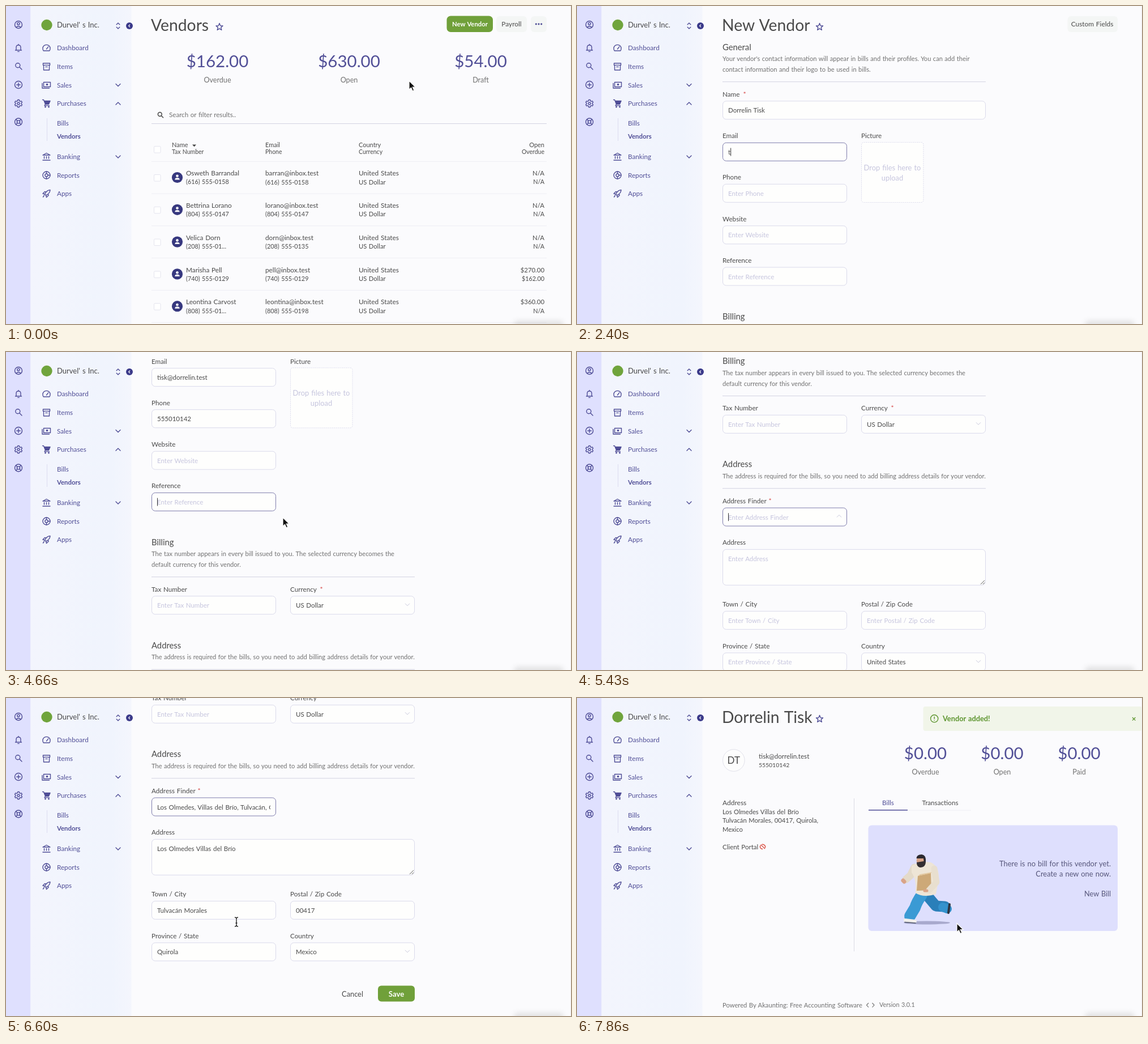
An HTML page for the animation above (7.93 s loop, 998x561 px).

```html
<!DOCTYPE html>
<html lang="en">
<head>
<meta charset="utf-8">
<title>New vendor</title>
<style>
html, body { margin: 0; width: 100%; height: 100%; overflow: hidden; background: #fbfbfd; }
#stage { display: block; width: 998px; height: 561px; }
text { font-family: Lato, "Open Sans", sans-serif; fill: #4a4a4a; word-spacing: .06em; white-space: pre; }
.r { text-anchor: end; }
.m { text-anchor: middle; }
.b { font-weight: 700; }
.p { fill: #514f97; }
.g { fill: #717171; }
.d { fill: #56567a; }
.w { fill: #fff; }
.h { fill: #c6c5de; }
.red { fill: #d33a3a; }
.ok { fill: #5d952f; }
.i { fill: none; stroke: #4f4d96; stroke-width: 1.4; stroke-linecap: round; stroke-linejoin: round; }
.s { fill: #4f4d96; stroke: none; }
.box { fill: #fefefd; stroke: #dadaeb; }
.focus { stroke: #7f7dad; }
.hover { stroke: #93929f; }
.rule { stroke: #d3d3e2; }
.soft { stroke: #eeeef4; }
</style>
</head>
<body>
<svg id="stage" viewBox="0 0 998 561"></svg>
<script>
const LOOP = 7930;
const stage = document.getElementById('stage');

// Drawing helpers; text is centred on y
const txt = (x, y, s, size = 11.7, cls = '') =>
  `<text x="${x}" y="${(y + size * .36).toFixed(2)}" font-size="${size}" class="${cls}">${s}</text>`;
const rect = (x, y, w, h, r, attrs) => `<rect x="${x}" y="${y}" width="${w}" height="${h}" rx="${r}" ${attrs}/>`;
const line = (x1, y1, x2, y2, cls = 'rule') => `<path d="M${x1} ${y1}L${x2} ${y2}" class="${cls}"/>`;
const icon = (x, y, d, more = '') => `<g class="i" transform="translate(${x} ${y})"><path d="${d}"/>${more}</g>`;
const dot = (r, cls = '', x = 0, y = 0) => `<circle cx="${x}" cy="${y}" r="${r}" class="${cls}"/>`;
const group = (id, body) => `<g id="${id}">${body}</g>`;
const down = 'M-4-2L0 2L4-2', up = 'M-4 2L0-2L4 2';
const star = (x, y) => icon(x, y, 'M0-6L1.7-1.8L6-1.5L2.7 1.4L3.8 5.8L0 3.4L-3.8 5.8L-2.7 1.4L-6-1.5L-1.7-1.8Z');
const title = (s, starX) => txt(256, 34, s, 28.3) + star(starX, 36.5);
const amount = (x, s, label) => txt(x, 97.5, s, 29.5, 'm p') + txt(x, 130.5, label, 12.6, 'm g');

function rail() {
  const spokes = 'M-4.6-4.6L-1.8-1.8M4.6-4.6L1.8-1.8M-4.6 4.6L-1.8 1.8M4.6 4.6L1.8 1.8';
  const teeth = 'M-1.3-6.5H1.3L1.8-4.6L3.4-3.7L5.3-4.3L6.5-2L5.1-.7V.7L6.5 2L5.3 4.3L3.4 3.7L1.8 4.6L1.3 6.5H-1.3L-1.8 4.6L-3.4 3.7L-5.3 4.3L-6.5 2L-5.1.7V-.7L-6.5-2L-5.3-4.3L-3.4-3.7L-1.8-4.6Z';
  return rect(0, 0, 43.5, 561, 0, 'fill="#dfe0fe"') +
    icon(22, 33, 'M-4.2 4.6Q0 .9 4.2 4.6', dot(6.5) + dot(2.1, '', 0, -1.8)) +
    icon(22, 74, 'M-5.5 4H5.5M-4 4V-1Q-4-5 0-5Q4-5 4-1V4M0-6.5V-5M-1.2 6.4H1.2') +
    icon(22, 106, 'M1.8 1.8L6 6', dot(4, '', -1.2, -1.2)) +
    icon(22, 139, 'M-3.2 0H3.2M0-3.2V3.2', dot(6.5)) +
    icon(22, 172, teeth, dot(2)) +
    icon(22, 204.5, spokes, dot(6.5) + dot(2.6));
}

function menu() {
  const items = [
    [74, 'Dashboard', 'M-5.2 5A6.6 6.6 0 1 1 5.2 5ZM0 2L3.2-2.2'],
    [107, 'Items', 'M-6-6H6V-2.6H-6ZM-5-2.6V6H5V-2.6M-1.6 .4H1.6'],
    [139.5, 'Sales', 'M-5-5H7V3H-5ZM-7.5-3V5.5H5', down],
    [172, 'Purchases', 'M-7-6.5H-5L-2 1.3H4L6.5-4.5H-4.2L-2 1.3L-3.5 3.6H5', up],
    [266, 'Banking', 'M-6.5-3L0-6.5L6.5-3ZM-4-.5V3M0-.5V3M4-.5V3M-6.5 6H6.5', down],
    [298.5, 'Reports', 'M0-6.5V-2.5M0 6.5V2.5M2.5 0H6.5'],
    [331, 'Apps', 'M-3 1Q0-6 6.5-6.5Q6 0-1 3ZM-3 1L-6.5 0L-3-3.6L-1-3M-1 3L0 6.5L3.6 3L3 1M-4 3L-6 6']
  ];
  const extra = {
    Sales: dot(1.8, 's', 1, -1),
    Purchases: '<path class="s" d="M-4.5-4.5H6.5L4 1.3H-2Z"/>' + dot(1.4, 's', -2, 6) + dot(1.4, 's', 4, 6),
    Reports: dot(6.5) + dot(2.6)
  };
  return rect(43.5, 0, 178, 561, 0, 'fill="url(#panel)"') +
    '<circle cx="72" cy="33.5" r="9.7" fill="#70a43c"/>' +
    txt(90, 33.5, "Durvel' s Inc.", 13) +
    icon(198, 35, 'M-2.8-2.2L0-5L2.8-2.2M-2.8 2.2L0 5L2.8 2.2') +
    '<circle cx="218" cy="35" r="6" fill="#3b3a8a"/><path d="M219 32.7L216.7 35L219 37.3" fill="none" stroke="#fff" stroke-width="1.2"/>' +
    items.map(([y, s, d, arrow]) => icon(71.5, y, d, extra[s]) + txt(90, y, s, 11.7, 'p') +
      (arrow ? icon(198, y, arrow) : '')).join('') +
    '<path d="M72.5 198V238" stroke="#dcdcf0"/>' +
    txt(90, 206.5, 'Bills', 11.7, 'p') + txt(90, 230, 'Vendors', 11.4, 'b p');
}

function listPage() {
  const people = [
    ['Osweth Barrandal', 'barran@inbox.test', '(616) 555-0158', 'N/A', 'N/A'],
    ['Bettrina Lorano', 'lorano@inbox.test', '(804) 555-0147', 'N/A', 'N/A'],
    ['Velica Dorn', 'dorn@inbox.test', '(208) 555-0135', 'N/A', 'N/A', 1],
    ['Marisha Pell', 'pell@inbox.test', '(740) 555-0129', '$270.00', '$162.00'],
    ['Leontina Carvost', 'leontina@inbox.test', '(808) 555-0198', '$360.00', 'N/A', 1]
  ];
  const check = y => rect(261.5, y - 5.5, 11.5, 11.5, 1.5, 'fill="#fff" stroke="#e4e4ee"');
  const head = (x, a, b, cls = '') => txt(x, 245, a, 11, cls) + txt(x, 257.5, b, 10.5, cls);
  const rows = people.map(([name, mail, phone, open, due, cut], i) => {
    const y = 295 + i * 56.8, y2 = y + 15.6;
    return check(y + 8) + `<circle cx="302.5" cy="${y + 7.5}" r="9.6" fill="#37387f"/>` +
      `<path d="M298.3 ${y + 11.5}q0-3.4 4.2-3.4t4.2 3.4z" fill="#fff"/><circle cx="302.5" cy="${y + 4.8}" r="2.3" fill="#fff"/>` +
      txt(318, y, name, 11.8) + txt(318, y2, cut ? phone.slice(0, 12) + '...' : phone, 10.8) +
      txt(458, y, mail, 11.8) + txt(458, y2, phone, 10.9) +
      txt(623, y, 'United States', 11.9) + txt(623, y2, 'US Dollar', 11.2) +
      txt(951, y, open, 11.4, 'r') + txt(951, y2, due, 10.8, 'r') +
      line(257, y + 36, 955, y + 36, 'soft');
  }).join('');
  return title('Vendors', 377) +
    rect(778.5, 17.5, 81.5, 28.5, 7, 'id="newBtn"') + txt(819.5, 32, 'New Vendor', 11.3, 'm b w') +
    rect(866, 18, 54, 28, 6, 'fill="#f4f6f5"') + txt(893, 32, 'Payroll', 11.9, 'm') +
    rect(927, 18, 28, 28, 6, 'fill="#f4f6f5"') +
    [936.3, 941, 945.7].map(x => dot(1.6, 's', x, 31.8)).join('') +
    amount(373.5, '$162.00', 'Overdue') + amount(606, '$630.00', 'Open') + amount(838.5, '$54.00', 'Draft') +
    '<g fill="none" stroke="#444" stroke-width="1.5"><circle cx="271.8" cy="191" r="3.4"/><path d="M274.3 193.5L278 197.2"/></g>' +
    txt(288, 192, 'Search or filter results..', 11.6, 'g') + line(257, 207.5, 955, 207.5) +
    check(253) + head(293, 'Name', 'Tax Number') + '<path d="M329 244.5h7l-3.5 3.7z" fill="#424242"/>' +
    head(458, 'Email', 'Phone') + head(623, 'Country', 'Currency') + head(951, 'Open', 'Overdue', 'r') +
    line(257, 274.3, 955, 274.3, 'soft') + rows;
}

// Form fields: id, label, x, label y, width, x of the required mark, kind
const FIELDS = [
  ['name', 'Name', 257, 155.5, 465, 296],
  ['email', 'Email', 257, 229, 220],
  ['phone', 'Phone', 257, 302, 220],
  ['website', 'Website', 257, 375.5, 220],
  ['ref', 'Reference', 257, 448.7, 220],
  ['tax', 'Tax Number', 257, 631, 220],
  ['currency', 'Currency', 502, 631, 220, 557, 'select'],
  ['finder', 'Address Finder', 257, 794.7, 220, 341, 'finder'],
  ['address', 'Address', 257, 868, 465, 0, 'area'],
  ['town', 'Town / City', 257, 977, 220],
  ['zip', 'Postal / Zip Code', 502, 977, 220],
  ['state', 'Province / State', 257, 1050.5, 220],
  ['country', 'Country', 502, 1050.5, 220, 0, 'select']
];

function field([id, label, x, y, w, mark, kind]) {
  const top = y + 11.8, area = kind === 'area';
  return txt(x, y, label, 11.7) + (mark ? txt(mark, y, '*', 12, 'm red') : '') +
    rect(x + .5, top + .5, w - 1, area ? 63 : 32, 6, `class="box" id="${id}Box"`) +
    `<svg x="${x + 10}" y="${top}" width="${w - 20}" height="33"><text id="${id}" y="21" font-size="11.5"></text></svg>` +
    (kind === 'select' ? `<path d="M${x + 203} ${top + 13.5}l4 4l4-4" fill="none" stroke="#c9c9dc"/>` : '') +
    (kind === 'finder' ? `<path id="finderArrow" d="M${x + 202} ${top + 17}l4-4l4 4" fill="none" stroke="#c9c9dc"/>` : '') +
    (area ? `<path d="M${x + 456} ${top + 62}l7-7M${x + 460} ${top + 62}l3-3" stroke="#555"/>` : '');
}

function formPage() {
  const section = (y, name, lines) => {
    const end = y + 42.7 + (lines.length - 1) * 18.7;
    return txt(257, y, name, 14.8) +
      lines.map((s, i) => txt(257, y + 21 + i * 18.7, s, 11.1, 'g')).join('') + line(257, end, 722, end);
  };
  return group('doc', title('New Vendor', 428.5) +
    rect(866.5, 18, 88.5, 28, 6, 'fill="#f4f6f5"') + txt(910, 32, 'Custom Fields', 11.9, 'm') +
    section(72.3, 'General', ["Your vendor's contact information will appear in bills and their profiles. You can add their",
      'contact information and their logo to be used in bills.']) +
    section(548, 'Billing', ['The tax number appears in every bill issued to you. The selected currency becomes the',
      'default currency for this vendor.']) +
    section(730, 'Address', ['The address is required for the bills, so you need to add billing address details for your vendor.']) +
    txt(502, 229, 'Picture', 11.7) +
    rect(502.5, 240.5, 109.5, 106, 4, 'fill="#fefefd" stroke="#dcdcec" stroke-dasharray="2 1.5"') +
    txt(557, 285, 'Drop files here to', 12.9, 'm h') + txt(557, 303.5, 'upload', 12.9, 'm h') +
    FIELDS.map(field).join('') +
    txt(612, 1153, 'Cancel', 12.8, 'm') + rect(657, 1138.5, 65, 28, 6, 'id="saveBtn"') + txt(689.5, 1153, 'Save', 13.2, 'm b w') +
    '<path id="caret" stroke="#333"/>');
}

function runner() {
  const limb = (d, color, w) => `<path d="${d}" fill="none" stroke="${color}" stroke-width="${w}" stroke-linecap="round" stroke-linejoin="round"/>`;
  return '<ellipse cx="618" cy="396.5" rx="41" ry="3" fill="#7d7fa6" opacity=".55"/>' +
    limb('M618 348L634 367L650 368', '#2a7fb9', 19) + limb('M646 369L654 372', '#3492cd', 16) +
    limb('M609 347Q600 360 597 370L588 385', '#3a9ad4', 20) +
    limb('M658 364L656 379', '#2f3440', 4) +
    limb('M580 392L597 394', '#f1efec', 6) + limb('M579 395.5L598 397', '#50566a', 1.5) +
    limb('M596 299L589 313L581 320', '#e4dac9', 13) + limb('M576 322L578 324', '#d9a488', 7) +
    '<path d="M591 296Q606 287 625 290Q640 297 639 319L634 346Q612 353 598 344Q600 320 591 308Z" fill="#eee5d6"/>' +
    '<path d="M602 314L625 309L626 339L600 340Z" fill="#cda978"/><path d="M602 314L606 311L628 307L625 309Z" fill="#e2c69d"/>' +
    limb('M631 301L635 325L622 339', '#e8dfcf', 11) + limb('M618 340L614 340', '#d9a488', 5) +
    '<ellipse cx="607.5" cy="287" rx="7.8" ry="9" fill="#d9a488"/>' +
    '<path d="M599.5 283Q600 276 609 276Q617 277 616 289L613 291L612 283Z" fill="#2c2a30"/>' +
    '<path d="M600 290L612 288L616 288Q616 299 606 299Q600 298 600 290Z" fill="#342f33"/>';
}

function detailPage() {
  return title('Dorrelin Tisk', 428.5) +
    '<circle cx="276.8" cy="110" r="19.3" fill="#fdfdfd" stroke="#e1e1ea"/>' + txt(276.8, 110, 'DT', 17, 'm') +
    txt(321, 102.5, 'tisk@dorrelin.test', 11.6) + txt(321, 118, '555010142', 10.4) +
    amount(615.5, '$0.00', 'Overdue') + amount(751, '$0.00', 'Open') + amount(887, '$0.00', 'Paid') +
    txt(257, 185, 'Address', 12) + txt(257, 200.5, 'Los Olmedes Villas del Brío', 11.2) +
    txt(257, 216, 'Tulvacán Morales, 00417, Quirola,', 11.2) + txt(257, 231.5, 'Mexico', 11.2) +
    txt(257, 263, 'Client Portal', 11.5) +
    '<path d="M324.6 258.6L332 266M324.5 260A5 4 0 0 0 328 266.5M326.5 258.4A5 4.2 0 0 1 332 264.5" fill="none" stroke="#d9483b" stroke-width="1.3"/>' +
    '<path d="M489.5 177V447" stroke="#dadae4"/>' +
    txt(549.5, 185, 'Bills', 11.7, 'm p') + txt(641.5, 185, 'Transactions', 11.7, 'm') +
    line(584, 198, 696, 198, 'soft') + '<path d="M515 197.8H584" stroke="#4f4d96" stroke-width="1.5"/>' +
    rect(514.5, 224.5, 440.5, 186.5, 6, 'fill="#dedffd"') + runner() +
    txt(943, 292, 'There is no bill for this vendor yet.', 12.9, 'r d') +
    txt(943, 310.5, 'Create a new one now.', 12.9, 'r d') + txt(943, 345, 'New Bill', 12.7, 'r d') +
    txt(257, 541.5, 'Powered By Akaunting: Free Accounting Software', 11.2, 'g') +
    '<path d="M515 538L511.5 541.8L515 545.6M521.5 538L525 541.8L521.5 545.6" fill="none" stroke="#777" stroke-width="1.2"/>' +
    txt(534, 541.5, 'Version 3.0.1', 10.8, 'g') +
    group('toast', rect(611.5, 15, 387, 43, 4, 'fill="#f1f5e9"') +
      '<g fill="none" stroke="#5d952f" stroke-width="1.4"><circle cx="631.2" cy="36.3" r="6.6"/><path d="M631.2 32.7V37M631.2 38.7V40"/></g>' +
      txt(646, 36.8, 'Vendor added!', 12.8, 'b ok') +
      '<path d="M981 34.2L986.4 39.6M986.4 34.2L981 39.6" stroke="#5d952f" stroke-width="1.3"/>');
}

const BEAM = 'M-3-8Q0-8 0-6Q0-8 3-8M0-6V6M-3 8Q0 8 0 6Q0 8 3 8M-1.5 2H1.5';

stage.innerHTML = `<defs>
  <linearGradient id="panel"><stop offset="0" stop-color="#f3f5fd"/><stop offset=".8" stop-color="#f0f4fd"/><stop offset="1" stop-color="#f4f6fd"/></linearGradient>
  <filter id="blur" x="-30%" y="-100%" width="160%" height="300%"><feGaussianBlur stdDeviation="4"/></filter></defs>` +
  rect(0, 0, 998, 561, 0, 'fill="#fbfbfd"') +
  group('list', listPage()) + group('form', formPage()) + group('detail', detailPage()) +
  rail() + menu() + '<path d="M997.5 0V561" stroke="#f0f0f3"/>' +
  rect(897, 555, 88, 14, 7, 'fill="#999" opacity=".24" filter="url(#blur)"') +
  group('arrow', '<path d="M0 0V15.5L3.6 12.2L6.2 18L8.8 16.8L6.3 11.2H11.2Z" fill="#111" stroke="#fff" stroke-width="1.2"/>') +
  group('beam', `<path d="${BEAM}" fill="none" stroke="#fff" stroke-width="3"/><path d="${BEAM}" fill="none" stroke="#222" stroke-width="1.4"/>`);

const $ = id => document.getElementById(id);
const show = (id, on) => $(id).setAttribute('visibility', on ? 'visible' : 'hidden');
const linear = k => k, smooth = k => k * k * (3 - 2 * k);

// Interpolates column c of a table of [time, value...]
function at(steps, t, ease = smooth, c = 1) {
  const i = steps.findIndex(s => s[0] > t);
  if (i < 0) return steps[steps.length - 1][c];
  if (i === 0) return steps[0][c];
  const a = steps[i - 1], b = steps[i];
  return a[c] + (b[c] - a[c]) * ease((t - a[0]) / (b[0] - a[0]));
}
const last = (steps, t) => steps.filter(s => s[0] <= t).pop()[1];

const POINTER = [[30, 712, 132], [200, 826, 30], [630, 826, 30], [1200, 448, 178], [1530, 448, 178],
  [1600, 489, 292], [5030, 489, 292], [5340, 372, 288], [6030, 372, 330], [6250, 372, 330],
  [6580, 407, 395], [6630, 407, 395], [7130, 690, 519], [7430, 690, 519], [7800, 671, 397.5]];
const SHAPE = [[0, 'arrow'], [1120, 'beam'], [1530, ''], [4400, 'arrow'], [5270, 'beam'], [5400, ''],
  [6030, 'arrow'], [6400, 'beam'], [6690, 'arrow']];
const SCROLL = [[4400, 0], [4660, 212], [4960, 400], [5030, 400], [5260, 532], [6250, 532], [6560, 631]];
const FOCUS = [[0, ''], [1120, 'name'], [2230, 'email'], [3650, 'phone'], [4200, 'website'], [4330, 'ref'], [5400, 'finder']];
const TYPING = {
  name: ['Dorrelin Tisk', [[1480, 0], [2170, 13]]],
  email: ['tisk@dorrelin.test', [[2300, 0], [2760, 7], [2840, 7], [3580, 18]]],
  phone: ['555010142', [[3690, 0], [4060, 9]]],
  finder: ['Los Olmedes', [[5460, 0], [5980, 11]]]
};
const PICK = 6130;
const PICKED = {
  finder: 'Los Olmedes, Villas del Brío, Tulvacán, Quirola',
  address: 'Los Olmedes Villas del Brío', town: 'Tulvacán Morales', zip: '00417', state: 'Quirola', country: 'Mexico'
};
const PRESET = { currency: 'US Dollar', country: 'United States' };

function valueOf(id, t) {
  if (t >= PICK && PICKED[id]) return PICKED[id];
  if (!TYPING[id]) return PRESET[id] || '';
  const [s, steps] = TYPING[id];
  return s.slice(0, Math.floor(at(steps, t, linear) + 1e-6));
}

function drawForm(t) {
  const focus = last(FOCUS, t);
  $('doc').setAttribute('transform', `translate(0 ${-at(SCROLL, t, linear)})`);
  $('saveBtn').setAttribute('fill', t > 7050 ? '#5f8c30' : '#70a03a');
  show('finderArrow', t < PICK);
  $('caret').setAttribute('d', '');
  for (const [id, label, x, y] of FIELDS) {
    const value = valueOf(id, t), el = $(id);
    el.textContent = value || 'Enter ' + label;
    el.setAttribute('class', value ? '' : 'h');
    const on = id === focus;
    $(id + 'Box').setAttribute('class', 'box' + (on ? t < 1500 ? ' hover' : ' focus' : ''));
    if (on && t >= 1500 && t < PICK) {
      const cx = x + 10.5 + (value ? el.getComputedTextLength() : 0);
      $('caret').setAttribute('d', `M${cx} ${y + 21.5}v14`);
    }
  }
}

function draw(t) {
  const page = t < 630 ? 'list' : t < 7430 ? 'form' : 'detail';
  for (const id of ['list', 'form', 'detail']) $(id).style.display = id === page ? '' : 'none';
  $('newBtn').setAttribute('fill', t > 130 ? '#5f8c30' : '#70a03a');
  if (page === 'form') drawForm(t);
  const slide = at([[7460, 0], [7640, 1]], t);
  $('toast').setAttribute('transform', `translate(${(1 - slide) * 390} 0)`);
  const shape = last(SHAPE, t);
  const x = at(POINTER, t, smooth, 1), y = at(POINTER, t, smooth, 2);
  for (const id of ['arrow', 'beam']) {
    show(id, id === shape);
    $(id).setAttribute('transform', `translate(${x} ${y})`);
  }
}

const start = performance.now();
function tick() {
  draw((performance.now() - start) % LOOP);
  requestAnimationFrame(tick);
}
tick();
</script>
</body>
</html>
```
